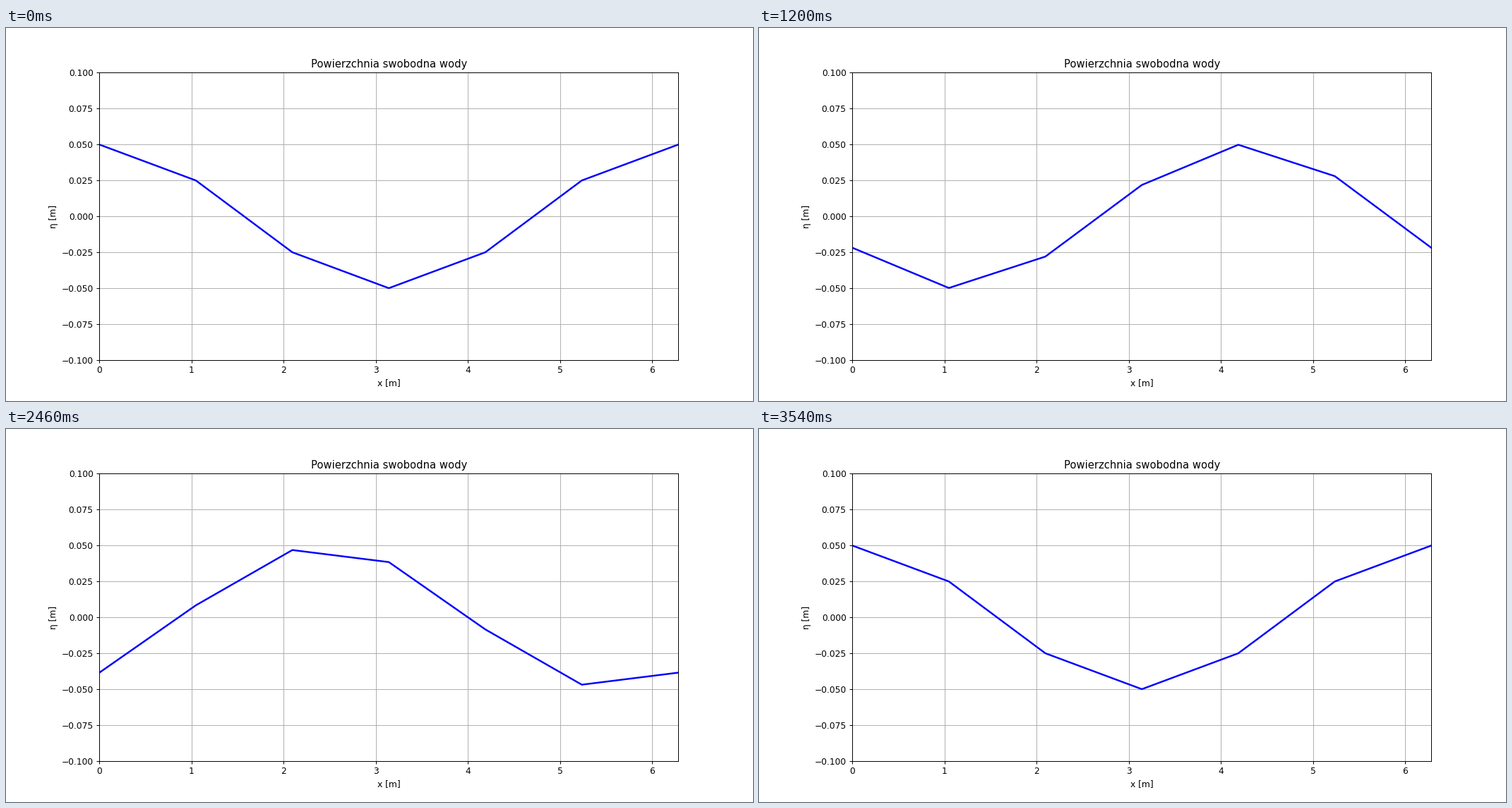
Animation, 1058 px wide and 529 px high, one loop 3.6 s. Source, as a matplotlib script:

```python
import numpy as np
import matplotlib.pyplot as plt
from matplotlib.animation import FuncAnimation

FRAMES = 60
INTERVAL = 60        # ms
AMPLITUDE = 0.05     # m
PERIODS = 2          # wave periods per loop

plt.rcParams["font.family"] = "DejaVu Sans"

x = np.linspace(0, 2 * np.pi, 7)
phases = np.linspace(0, PERIODS * 2 * np.pi, FRAMES)


def surface(phase):
    return AMPLITUDE * np.cos(x - phase)


fig, ax = plt.subplots(figsize=(12, 6), dpi=1058 / 12)
line, = ax.plot(x, surface(0), color="blue", linewidth=2)
ax.set_xlim(0, 2 * np.pi)
ax.set_ylim(-0.1, 0.1)
ax.set_xlabel("x [m]")
ax.set_ylabel("η [m]")
ax.set_title("Powierzchnia swobodna wody")
ax.grid(True)


def update(frame):
    line.set_ydata(surface(phases[frame]))
    return line,


anim = FuncAnimation(fig, update, frames=FRAMES, interval=INTERVAL, repeat=True)
plt.show()
```
